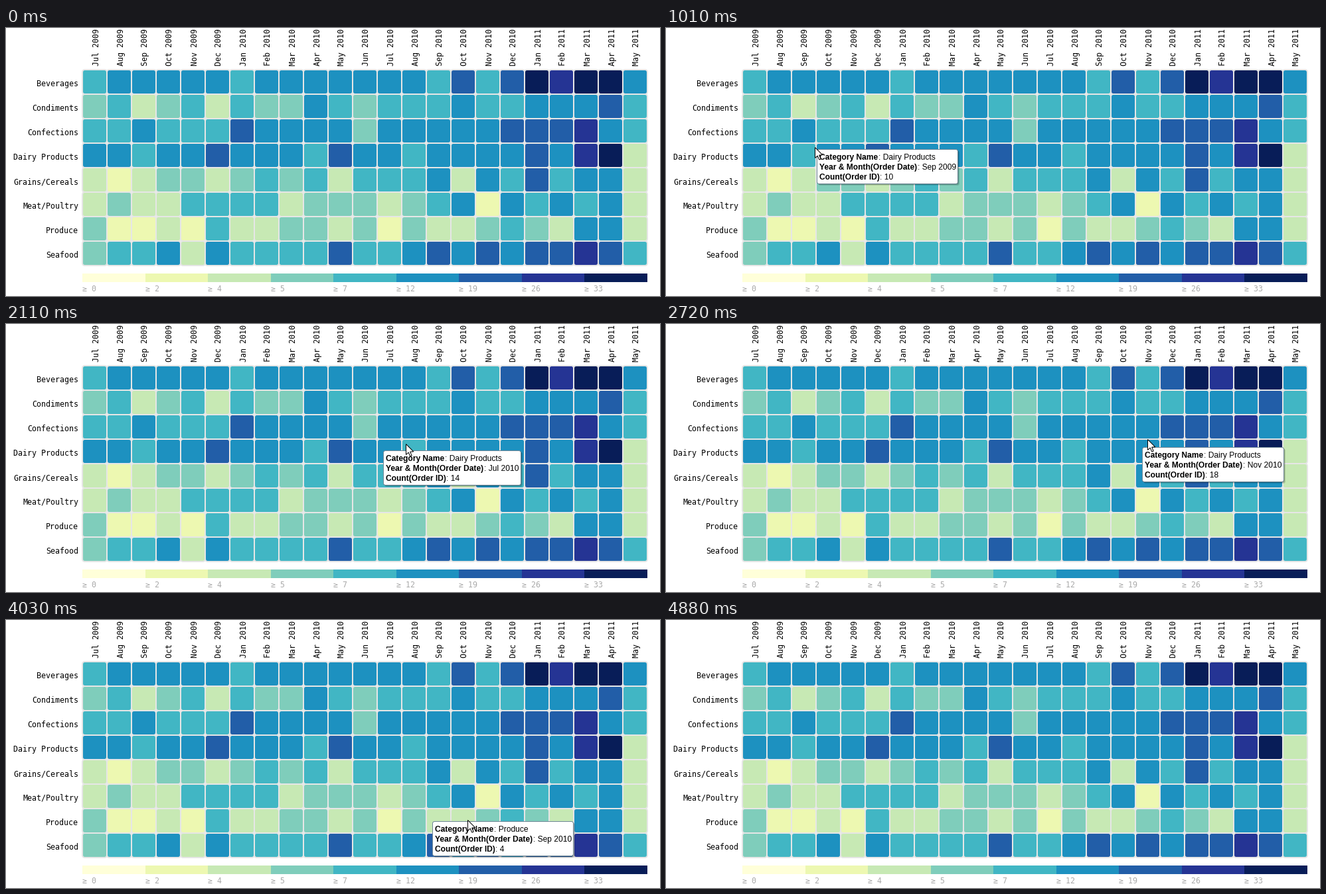
Animation of 985x405 px, one loop 6370 ms. Source, as a matplotlib script:

```python
import matplotlib.pyplot as plt
import numpy as np
from matplotlib.animation import FuncAnimation
from matplotlib.collections import PatchCollection
from matplotlib.patches import FancyBboxPatch, Polygon, Rectangle

W, H, DPI = 985, 405, 100
LOOP, STEP = 6370, 35
LEFT, TOP, CELL = 115, 63, 37
PX = 72 / DPI  # points per pixel

PALETTE = ["#ffffd9", "#edf8b1", "#c7e9b4", "#7fcdbb", "#41b6c4",
           "#1d91c0", "#225ea8", "#253494", "#081d58"]
LOWS = [0, 2, 4, 5, 7, 12, 19, 26, 33, 40]
LEVELS = {
    "Beverages":      "45555545555555464687885",
    "Condiments":     "34234243354344454455564",
    "Confections":    "44544465555355555666754",
    "Dairy Products": "55455655546554555565782",
    "Grains/Cereals": "21233234342444525464552",
    "Meat/Poultry":   "23224444233323451545452",
    "Produce":        "31121422332313223432552",
    "Seafood":        "34452544446445656566764",
}
ROWS = list(LEVELS)
NAMES = "Jan Feb Mar Apr May Jun Jul Aug Sep Oct Nov Dec".split()
MONTHS = [f"{NAMES[m % 12]} {2009 + m // 12}" for m in range(6, 29)]

# Moments at which the pointer is redrawn
TICKS = np.concatenate([
    np.linspace(120, 570, 7), np.linspace(730, 1290, 7),
    np.linspace(1380, 1930, 8), [2020], np.linspace(2110, 2630, 8),
    np.linspace(2720, 3310, 8), [3400, 3475], np.linspace(3550, 4030, 7),
    np.linspace(4120, 4700, 8), [4790, 4880]])

# Pointer path: time, x, y
PATH = np.array([
    (120, 157, 9), (490, 194, 116), (730, 197, 121), (900, 224, 180),
    (1010, 224, 180), (1190, 271, 193), (1290, 271, 193), (1600, 400, 180),
    (1850, 529, 183), (1930, 531, 184), (2020, 565, 188), (2110, 602, 181),
    (2350, 640, 178), (2555, 675, 187), (2630, 714, 183), (2720, 725, 174),
    (2980, 761, 148), (3220, 752, 118), (3310, 751, 118), (3400, 714, 127),
    (3475, 673, 151), (3550, 631, 178), (3630, 606, 210), (3710, 603, 244),
    (3870, 612, 303), (3950, 639, 301), (4030, 695, 302), (4120, 690, 310),
    (4370, 596, 324), (4615, 757, 326), (4700, 757, 326), (4790, 706, 318)])

fig = plt.figure(figsize=(W / DPI, H / DPI), dpi=DPI, facecolor="white")
ax = fig.add_axes([0, 0, 1, 1])
ax.set(xlim=(0, W), ylim=(H, 0))
ax.axis("off")


def write(x, y, s, size=12, font="Liberation Sans", **kw):
    return ax.text(x, y, s, fontsize=size * PX, family=font,
                   va="baseline", **kw)


def mono(x, y, s, **kw):
    return write(x, y, s, 11.63, "DejaVu Sans Mono", **kw)


def rounded(x, y, w, h, r, **kw):
    style = f"round,pad=0,rounding_size={r}"
    return FancyBboxPatch((x, y), w, h, boxstyle=style, **kw)


def draw_chart():
    cells, colors = [], []
    for r, name in enumerate(ROWS):
        mono(109, 88 + CELL * r, name, ha="right")
        for c, level in enumerate(LEVELS[name]):
            cells.append(rounded(LEFT + CELL * c, TOP + CELL * r,
                                 CELL, CELL, 4))
            colors.append(PALETTE[int(level)])
    ax.add_collection(PatchCollection(cells, facecolors=colors,
                                      edgecolors="#e6e6e6",
                                      linewidths=2 * PX), autolim=False)
    for c, month in enumerate(MONTHS):
        mono(139.5 + CELL * c, 57, month, rotation=90,
             rotation_mode="anchor", ha="left")
    seg = CELL * len(MONTHS) / len(PALETTE)
    for i, color in enumerate(PALETTE):
        ax.add_patch(Rectangle((LEFT + seg * i, 371), seg, 13, fc=color, lw=0))
        mono(LEFT + seg * i, 398, f"≥ {LOWS[i]}", color="#aaaaaa")


def width(text):
    return text.get_window_extent().width


class Tooltip:
    HEADS = ["Category Name", "Year & Month(Order Date)", "Count(Order ID)"]

    def __init__(self):
        self.shades = [rounded(0, 0, 1, 1, 3, fc="black", lw=0, alpha=0.14,
                               zorder=5) for _ in range(2)]
        self.box = rounded(0, 0, 1, 1, 3, fc="white", ec="#6f8796",
                           lw=PX, zorder=6)
        for patch in (*self.shades, self.box):
            ax.add_patch(patch)
        self.heads = [write(0, 0, s, weight="bold", zorder=7)
                      for s in self.HEADS]
        self.values = [write(0, 0, "", zorder=7) for _ in self.HEADS]
        self.head_widths = [width(h) for h in self.heads]
        self.parts = [*self.shades, self.box, *self.heads, *self.values]

    def show(self, x, y):
        row = int((y - TOP) // CELL)
        col = int((x - LEFT - 3.5) // CELL)
        visible = 0 <= row < len(ROWS) and 0 <= col < len(MONTHS)
        for part in self.parts:
            part.set_visible(visible)
        if not visible:
            return
        level = int(LEVELS[ROWS[row]][col])
        span = LOWS[level + 1] - LOWS[level]
        count = LOWS[level] + (col + 5 * row + 31) % span
        lines = (ROWS[row], MONTHS[col], count)
        for i, line in enumerate(lines):
            base = y + 19 + 15 * i
            self.heads[i].set_position((x + 7, base))
            self.values[i].set_position((x + 7.5 + self.head_widths[i], base))
            self.values[i].set_text(f": {line}")
        w = round(self.head_widths[1] + width(self.values[1])) + 7
        self.box.set_bounds(x + 3.5, y + 3.5, w, 52)
        for d, shade in enumerate(self.shades, 1):
            shade.set_bounds(x + 3.5 + d, y + 3.5 + d, w + 0.5, 52.5)

    def hide(self):
        for part in self.parts:
            part.set_visible(False)


ARROW = np.array([(0, 0), (0, 16), (3.7, 12.6), (6.3, 18.5), (8.7, 17.5),
                  (6.2, 11.6), (11.3, 11.4)])

draw_chart()
tip = Tooltip()
pointer = ax.add_patch(Polygon(ARROW, fc="white", ec="black", lw=PX,
                               zorder=9))


def place(tick):
    t = TICKS[max(tick, 0)]
    return tuple(np.rint([np.interp(t, PATH[:, 0], PATH[:, k])
                          for k in (1, 2)]))


def update(i):
    tick = np.searchsorted(TICKS, i * STEP + STEP - 1, side="right") - 1
    active = 0 <= tick < len(TICKS) - 1
    pointer.set_visible(active)
    if active:
        pointer.set_xy(ARROW + place(tick) + np.array([0.5, 0.5]))
        tip.show(*place(tick - 1))  # the tooltip trails by one step
    else:
        tip.hide()
    return [pointer, *tip.parts]


anim = FuncAnimation(fig, update, frames=LOOP // STEP, interval=STEP,
                     repeat=True, repeat_delay=0, cache_frame_data=False)
plt.show()
```
